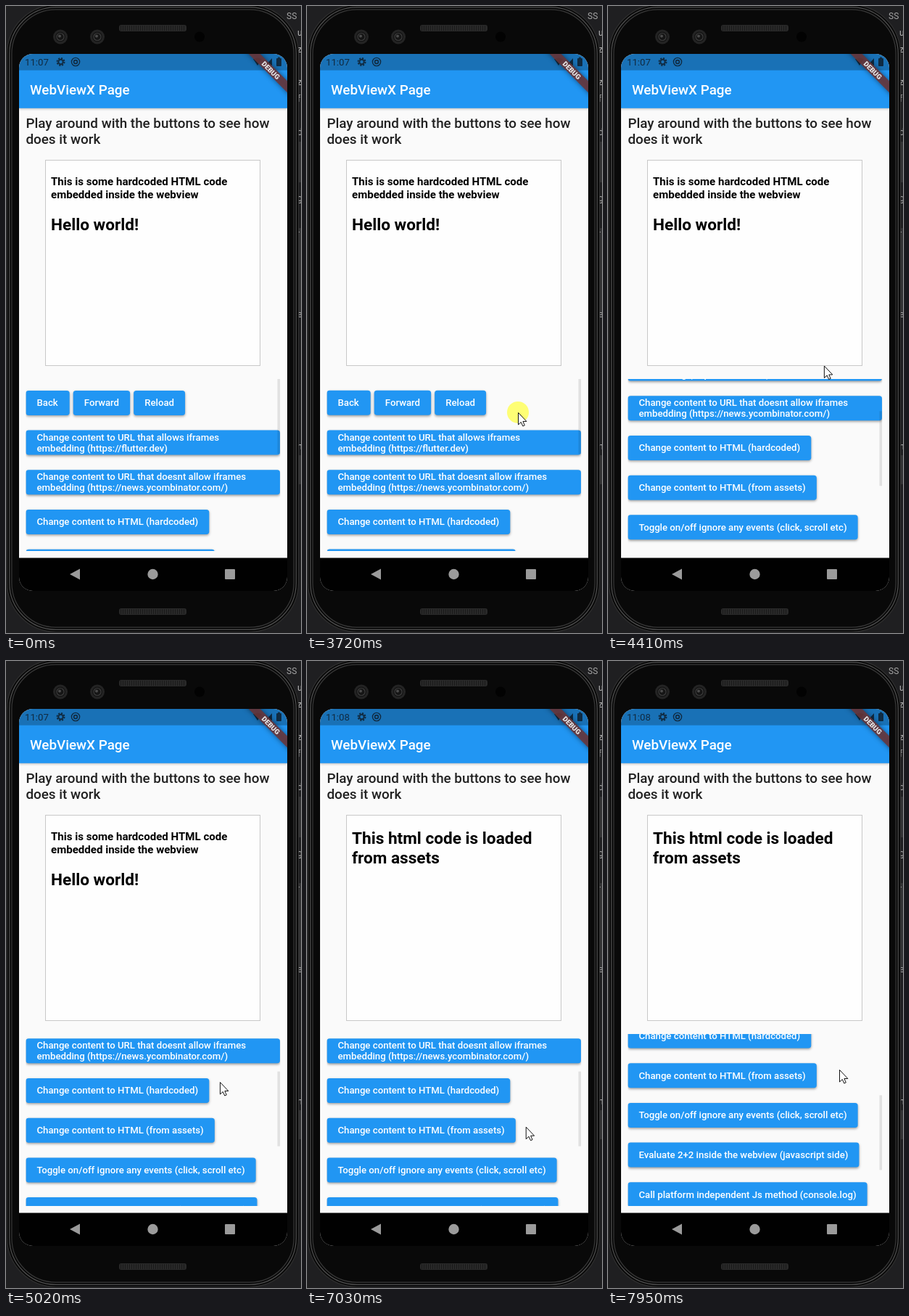
Recreate the animation shown at these times as an HTML page with a canvas. Size 407 by 864 pixels, loop 8 s.

```html
<!DOCTYPE html>
<html lang="en">
<head>
<meta charset="utf-8">
<style>
html, body { margin: 0; width: 100%; height: 100%; overflow: hidden; background: #1f1f21; }
canvas { display: block; width: 407px; height: 864px; }
</style>
</head>
<body>
<canvas id="stage" width="407" height="864"></canvas>
<script>
const ctx = document.getElementById('stage').getContext('2d');
const LOOP = 8000;
const STEP = 1000 / 13;
const DP = 370 / 392.7; // screen pixels per layout unit
const BLUE = '#2196f3';
const INK = '#102b42';
const ICON = '#9b9b9b';
const ROW = 54.7;
const LIST = { x: 27.4, y: 529.9, top: 514, w: 351, h: 237 };
const BODY = 20 * DP;

// Each move starts where the previous one ended; drags run at constant speed.
const START = { x: 379, y: 365 };
const MOVES = [
  { from: 1336, to: 2110, x: 120, y: 490 },
  { from: 2110, to: 2260, x: 114, y: 506 },
  { from: 2460, to: 2880, x: 136, y: 556 },
  { from: 3080, to: 3720, x: 291, y: 560 },
  { from: 3720, to: 4315, x: 298, y: 492, drag: true },
  { from: 4330, to: 5020, x: 295, y: 580 },
  { from: 5020, to: 5560, x: 225, y: 640 },
  { from: 6530, to: 7180, x: 314, y: 642 },
  { from: 7524, to: 7951, x: 319, y: 563, drag: true }
];
const CLICK = { from: 5700, to: 5865 };

const BUTTONS = [
  ['Change content to URL that allows iframes', 'embedding (https://flutter.dev)'],
  ['Change content to URL that doesnt allow iframes', 'embedding (https://news.ycombinator.com/)'],
  ['Change content to HTML (hardcoded)'],
  ['Change content to HTML (from assets)'],
  ['Toggle on/off ignore any events (click, scroll etc)'],
  ['Evaluate 2+2 inside the webview (javascript side)'],
  ['Call platform independent Js method (console.log)']
];
const ASSETS = 3;

const clamp01 = v => Math.max(0, Math.min(1, v));
const progress = (t, from, to) => clamp01((t - from) / (to - from));
const smooth = k => k * k * (3 - 2 * k);
const easeOut = k => 1 - (1 - k) ** 2;

function pointerAt(t) {
  let { x, y } = START;
  for (const move of MOVES) {
    const k = progress(t, move.from, move.to);
    const e = move.drag ? k : smooth(k);
    x += (move.x - x) * e;
    y += (move.y - y) * e;
  }
  return { x, y };
}

// The list follows the first drag, coasts to rest, then follows the second.
function scrollAt(t) {
  const { y } = pointerAt(t);
  const pulled = 89;
  if (t < 3720) return 0;
  if (t < 4315) return pulled * (560 - y) / 68;
  if (t < 7480) return pulled + 30 * easeOut(progress(t, 4315, 4710));
  return 119 + 1.034 * Math.max(0, 636 - y);
}

const isPressed = t => (t >= CLICK.from && t < CLICK.to) ||
  MOVES.some(m => m.drag && t >= m.from - 50 && t <= m.to);

function text(str, x, y, size, color, weight = 400) {
  ctx.font = `${weight} ${size}px Roboto, sans-serif`;
  ctx.fillStyle = color;
  ctx.fillText(str, x, y);
}

function rect(x, y, w, h, color) {
  ctx.fillStyle = color;
  ctx.fillRect(x, y, w, h);
}

function roundRect(x, y, w, h, r, color) {
  ctx.beginPath();
  ctx.roundRect(x, y, w, h, r);
  ctx.fillStyle = color;
  ctx.fill();
}

function disc(x, y, r, color) {
  ctx.beginPath();
  ctx.arc(x, y, r, 0, Math.PI * 2);
  ctx.fillStyle = color;
  ctx.fill();
}

function ring(x, y, r, width, color) {
  ctx.beginPath();
  ctx.arc(x, y, r, 0, Math.PI * 2);
  ctx.lineWidth = width;
  ctx.strokeStyle = color;
  ctx.stroke();
}

function polygon(points, color) {
  ctx.beginPath();
  points.forEach(([x, y]) => ctx.lineTo(x, y));
  ctx.closePath();
  ctx.fillStyle = color;
  ctx.fill();
}

function castShadow(alpha, blur, dy) {
  ctx.shadowColor = `rgba(0,0,0,${alpha})`;
  ctx.shadowBlur = blur;
  ctx.shadowOffsetY = dy;
}

function drawDesk() {
  rect(0, 0, 407, 864, '#1f1f21');
  rect(402, 187, 5, 56, '#333335');
  rect(404, 306, 3, 116, '#333335');
  rect(403, 619, 4, 40, '#333335');
  text('SS', 387, 18, 12, '#a5a5a5');
  [...'uz zf d   g -    el      h'].forEach((ch, i) => text(ch, 402, 41 + i * 22.8, 12, '#b5b5b5'));
}

function drawGrille(y) {
  roundRect(156, y, 93, 9, 3, '#292929');
  for (let x = 158; x < 248; x += 3) rect(x, y + 1, 1, 7, '#1a1a1a');
}

function drawPhone() {
  ['#2f2f2f', '#505050', '#383838'].forEach((line, i) => {
    const inset = 1.5 + i * 3.2;
    roundRect(inset, inset - 3, 405 - inset * 2, 867 - inset * 2, 69 - inset, '#090909');
    ctx.lineWidth = 1.2;
    ctx.strokeStyle = line;
    ctx.stroke();
  });
  drawGrille(26);
  drawGrille(830);
  for (const x of [75, 126]) {
    disc(x, 42.5, 10, '#242424');
    disc(x, 42.5, 7, '#151515');
    ring(x, 42.5, 5, 1.2, '#3c3c3c');
    disc(x - 1, 41.5, 2, '#4a4a4a');
  }
  disc(267, 42.5, 7, '#020202');
}

function drawStatusBar(t) {
  rect(18, 66, 370, 22.6, '#1971b6');
  text(t < 6880 ? '11:07' : '11:08', 26, 82, 14 * DP, INK);
  ctx.setLineDash([2.2, 1.7]);
  ring(75.5, 77, 5, 2, INK);
  ctx.setLineDash([]);
  ring(75.5, 77, 3.2, 2, INK);
  ring(96, 77, 5.6, 1.4, INK);
  ring(96, 77, 2.4, 1.6, INK);
  polygon([[341, 73], [347, 71.5], [353, 73], [347, 82]], INK);
  polygon([[358, 82], [367, 82], [367, 72]], INK);
  roundRect(373, 72, 7, 11, 1, INK);
  rect(375, 70.6, 3, 2, INK);
}

function drawDebugBanner() {
  ctx.save();
  ctx.translate(388, 66);
  ctx.rotate(Math.PI / 4);
  castShadow(0.55, 7, 0);
  rect(-45, 28 * DP, 90, 12 * DP, 'rgba(108,54,58,.86)');
  castShadow(0, 0, 0);
  ctx.textAlign = 'center';
  text('DEBUG', 0, 35.5, 10.2 * DP, '#e8e8e8', 900);
  ctx.restore();
}

function drawWebView(t) {
  rect(54, 212, 297, 284, '#c8c8c8');
  rect(55, 213, 295, 282, '#fefefe');
  const line = (str, y, size) => text(str, 62, y, size * DP, '#000', 700);
  if (t < 6020) {
    line('This is some hardcoded HTML code', 247, 16);
    line('embedded inside the webview', 265, 16);
    line('Hello world!', 309, 24);
  } else {
    line('This html code is loaded', 252, 24);
    line('from assets', 279, 24);
  }
}

function drawButton(lines, x, y, press) {
  const size = 14 * DP;
  const isDouble = lines.length > 1;
  ctx.font = `500 ${size}px Roboto, sans-serif`;
  const w = isDouble ? 350.6 : Math.max(64 * DP, ctx.measureText(lines[0]).width + 32 * DP);
  ctx.save();
  castShadow(0.38, 3.5 + 4 * press.lift, 1.6 + 2 * press.lift);
  roundRect(x, y, w, 34, 4 * DP, BLUE);
  castShadow(0, 0, 0);
  if (press.alpha > 0) {
    ctx.clip();
    disc(226, y + 11, press.radius, `rgba(255,255,255,${press.alpha})`);
  }
  ctx.restore();
  const first = y + (isDouble ? 14 : 21.4);
  lines.forEach((line, i) => text(line, x + 16 * DP, Math.round(first + i * 15), size, '#fff', 500));
  return w;
}

function drawList(t) {
  const scroll = scrollAt(t);
  const top = LIST.y - scroll;
  const idle = { alpha: 0, lift: 0, radius: 0 };
  const fade = 1 - progress(t, 6270, 6420);
  const active = {
    alpha: t < CLICK.to ? 0 : 0.24 * fade,
    lift: progress(t, CLICK.to, 5980) * fade,
    radius: 20 + 190 * progress(t, CLICK.to, 6130)
  };
  ctx.save();
  ctx.beginPath();
  ctx.rect(LIST.x, LIST.top, LIST.w, LIST.h);
  ctx.clip();
  let x = LIST.x;
  for (const label of ['Back', 'Forward', 'Reload']) x += drawButton([label], x, top, idle) + 5;
  BUTTONS.forEach((lines, i) => drawButton(lines, LIST.x, top + ROW * (i + 1), i === ASSETS ? active : idle));
  rect(374.5, LIST.top + scroll * 0.434, 3.7, 103, 'rgba(0,0,0,.1)');
  ctx.restore();
}

function drawAppBar() {
  ctx.save();
  castShadow(0.25, 3, 1);
  rect(18, 88, 370, 52.8, BLUE);
  ctx.restore();
  text('WebViewX Page', 33, 122, BODY, '#fff', 500);
}

function drawNavBar() {
  rect(18, 760.5, 370, 46, '#010101');
  polygon([[88, 783], [102, 775.5], [102, 790.5]], ICON);
  disc(202.5, 783, 7.2, ICON);
  roundRect(302, 776, 14, 14, 1, ICON);
}

function drawScreen(t) {
  ctx.save();
  roundRect(18, 66, 370, 740, 19, '#fafafa');
  ctx.clip();
  drawWebView(t);
  drawList(t);
  drawAppBar();
  drawStatusBar(t);
  drawDebugBanner();
  text('Play around with the buttons to see how', 27.4, 168, BODY, '#212121', 500);
  text('does it work', 27.4, 190, BODY, '#212121', 500);
  drawNavBar();
  ctx.restore();
}

function drawPointer(t) {
  if (t < MOVES[0].from) return;
  const { x, y } = pointerAt(t);
  if (isPressed(t)) disc(x, y, 15, 'rgba(255,255,60,.7)');
  ctx.save();
  ctx.translate(x + 0.5, y + 0.5);
  polygon([[0, 0], [0, 16.5], [3.8, 13], [6.3, 18.5], [8.8, 17.4], [6.4, 12], [11.4, 12]], '#fff');
  ctx.lineWidth = 1;
  ctx.strokeStyle = '#111';
  ctx.stroke();
  ctx.restore();
}

// The motion advances at 13 pictures per second.
const stepped = t => 1336 + Math.floor((t - 1326) / STEP) * STEP;

function render(now) {
  const t = stepped(now % LOOP);
  drawDesk();
  drawPhone();
  drawScreen(t);
  drawPointer(t);
  requestAnimationFrame(render);
}
requestAnimationFrame(render);
</script>
</body>
</html>
```
